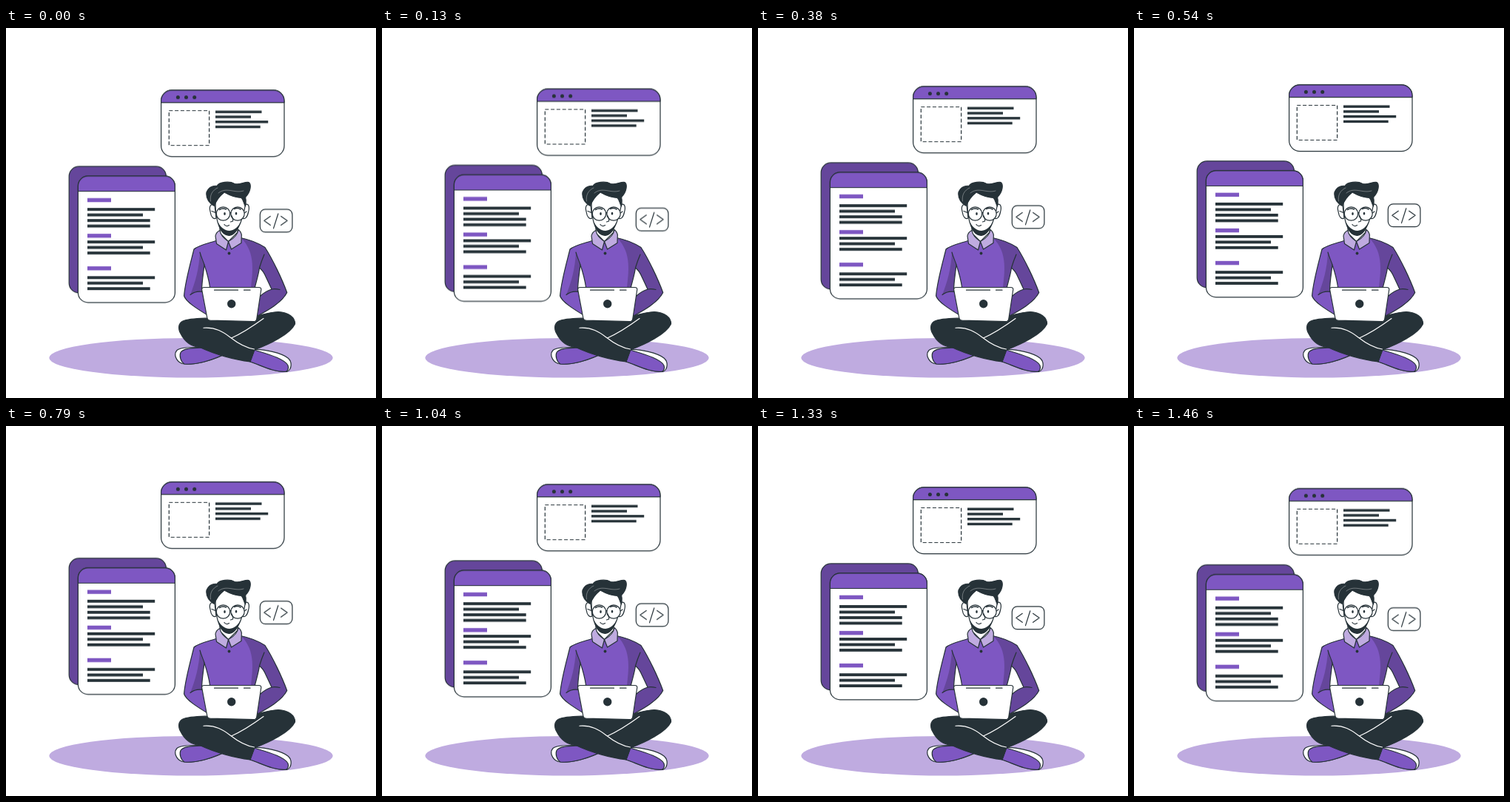
Write an HTML page that moves like this. It is 500 px wide and 500 px high and loops after 1.5 s.

```html
<!DOCTYPE html>
<html lang="en">
<head>
<meta charset="utf-8">
<title>Developer at work</title>
<style>
html, body { margin: 0; width: 100%; height: 100%; overflow: hidden; background: #fff; }
svg { display: block; width: 100vw; height: 100vh; }
.ink { fill: #263238; }
.main { fill: #7e57c2; }
.dark { fill: #65469b; }
.pale { fill: #bfabe0; }
.paper { fill: #fff; }
.none { fill: none; }
.line { stroke: #263238; stroke-width: 1.2; stroke-linecap: round; stroke-linejoin: round; }
.white { fill: none; stroke: #fff; stroke-width: 1.15; stroke-linecap: round; }
</style>
</head>
<body>
<svg viewBox="0 0 500 500">
  <ellipse class="pale" cx="250" cy="445.7" rx="191.7" ry="26.7"/>

  <g id="float">
    <g>
      <rect class="paper line" x="209.6" y="84.9" width="166.4" height="89.7" rx="14.5"/>
      <path class="main line" d="M209.6 101.6V99.4A14.5 14.5 0 0 1 224.1 84.9H361.5A14.5 14.5 0 0 1 376 99.4V101.6Z"/>
      <g class="ink">
        <circle cx="232.4" cy="94.4" r="2.5"/>
        <circle cx="243.5" cy="94.4" r="2.5"/>
        <circle cx="254.7" cy="94.4" r="2.5"/>
      </g>
      <rect class="none line" x="220.3" y="112.5" width="54.3" height="47" stroke-dasharray="5 2.8" style="stroke-linecap:butt"/>
    </g>
    <g>
      <rect class="dark line" x="85.2" y="187.9" width="131.2" height="171" rx="13.5"/>
      <rect class="paper line" x="97.4" y="200.9" width="131" height="171" rx="13.5"/>
      <path class="main line" d="M97.4 221.5V214.4A13.5 13.5 0 0 1 110.9 200.9H214.9A13.5 13.5 0 0 1 228.4 214.4V221.5Z"/>
    </g>
    <g id="bars"></g>
    <g class="none line">
      <rect class="paper" x="343.3" y="245.9" width="43.6" height="30.7" rx="7"/>
      <path d="M357.3 255.3L348.8 261.3L357.3 267.3M367.8 251.8L361.5 271.6M371.6 255.3L380.1 261.3L371.6 267.3"/>
    </g>
  </g>

  <g id="shoes">
    <path class="paper line" d="M262 431.5C248 431.5 236 431.500 231 435.500C226.500 440.500 229 450 238 453.500C252 456 276 450 291 443Z"/>
    <path class="main line" d="M266 432C252 432.500 240 432.500 236 438.500C234 443 236 451 241 454C257 455.500 277 449 293 442Z"/>
    <path class="paper line" d="M335 434.500C349 434 372 439 381 446C387 451 386.500 461 380 464.300C364 466 346 456 330 451Z"/>
    <path class="main line" d="M335.500 435C349 439.500 376 446 381 456C382.500 460 380.500 464 378 464.300C362 465.500 345 456 330 451Z"/>
  </g>

  <g id="legs">
    <path class="ink line" d="M274 392C262 392.500 247 392.500 239 396C233 399 232 406 236 413C241 423 250 430.500 262 431.500C282 441 309 448.500 330 450.800L336 434.800C355 428 384 414 390.500 400C391 391 381 384 368 383.500C356 384 348 387 340 389Z"/>
    <path class="white" d="M267 405.300C283 404 294 411 303 418C312 425 322 432 335.500 434M348 392.500C335 402 320 412 304.500 419"/>
  </g>

  <g id="body">
    <path class="main" d="M285 287C277 290 260 293.500 254 299C249 319 242 343 240.600 362C243 370 259 380 274 389H340C353 382 373 371 379.700 357.500C373 339 360 312 350 296.500C340 290 329 286 317 283.500Z"/>
    <path class="dark" d="M262 303C263 310 265 315 268 320L265 356C259 355.500 254 356.500 249 360.500C256 343 261 325 262 303Z"/>
    <path class="dark" d="M318 284C329 286 340 290 350 296.500C360 312 373 339 379.700 357.500C373 371 353 382 340 389L345 351H331C333 331 338 304 318 284Z"/>
    <path class="paper line" d="M268 320C271 329 274 339 275.500 350V356H264.500C264.500 343 267 330 268 320Z"/>
    <path class="paper line" d="M342.500 324C346 327 349 331 351 336L359 353C353 355 348 358 344 362L336 352C338 343 341 335 342.500 324Z"/>
    <path class="none line" d="M262 303C264 311 267 316 268 320M249 360.500C254 356.500 260 355.500 266 356.500M349 306C346 313 344 319 342.500 324M370 353.500C366 352.500 362 352.300 359 353"/>
    <path class="none line" d="M285 287C277 290 260 293.500 254 299C249 319 242 343 240.600 362C243 370 259 380 274 389M317 283.500C329 286 340 290 350 296.500C360 312 373 339 379.700 357.500C373 371 353 382 340 389"/>
    <path class="paper line" d="M289 269V277L300.500 288.500L313 276V266Z"/>
    <path class="pale line" d="M289 273.500C286 275 283.500 278 283 281L284.500 291.500L297.500 300L300.500 288.500C295 285 290 280 289 273.500ZM314 272.500C317 275 318.500 278 318.300 281L318 290.500L304.500 299L300.500 288.500C307 285 313 280 314 272.500Z"/>
    <circle class="ink" cx="301.500" cy="304.500" r="1.900"/>
  </g>

  <g id="head">
    <path class="paper line" d="M282 240C277 236 274 241 276 248C277 255 280 259 284 257ZM323 239C328 236 329.500 242 327.500 249C326 256 323 259 319 257Z"/>
    <path class="paper line" d="M283 236C283 252 284.500 260 288 268C291 276 296 280 301.500 280.300C308 280 313 273 317 263C320 255 323.500 245 324 232L311 221L289 222Z"/>
    <path class="ink" d="M286 261C288 272 293 280 301.500 280.500C309 280 314 272 317.500 261C314.500 268 309 273.500 302 274C295 273.500 289 269 286 261Z"/>
    <path class="ink line" d="M281.500 240.500C274 236 270 230 271 222C274 215 280 212.500 285 213.500C288 208 302 206.500 309 210.500C316 212.500 322 207.500 328 208.500C332 211 330.500 222 324 228C323 231 325 237 323.500 241C321 237 321 232 318 229.500C309 229 302 226 295 222C290 226 284 233 281.500 240.500Z"/>
    <path class="white" style="stroke-width:.5;opacity:.7" d="M276.500 234C275 226 279 219 286 216M287 223C298 214 309 224 321 220"/>
    <g class="none line">
      <circle class="paper" cx="293.500" cy="251" r="9.200"/>
      <circle class="paper" cx="313" cy="251" r="9.200"/>
      <path d="M302.500 250Q303.300 248.500 304 250M284.300 250L278 247.500M322.200 250L325 248"/>
      <path stroke-width="1.500" d="M288.500 245.500Q292.500 243 297.500 245M308.500 244.500Q313 242.500 317 245"/>
      <path d="M304.500 253C306 256 307.500 259 306.500 261L303.500 262M295 265.500C296.500 268 299.500 268 301.500 266.500"/>
    </g>
    <ellipse class="ink" cx="295.500" cy="251" rx="1.300" ry="1.900"/>
    <ellipse class="ink" cx="311" cy="250.700" rx="1.300" ry="1.900"/>
  </g>

  <g id="laptop">
    <path class="paper line" d="M268 350.500H341.500Q345.300 350.500 344.700 354L338.800 393Q338.200 396.800 334.500 396.600L276 395.200Q272.500 395 271.800 391.500L264.700 354Q264.200 350.500 268 350.500Z"/>
    <path class="none line" d="M281.500 354.200H313.500M321.500 354.200H330"/>
    <circle class="ink" cx="304.700" cy="372.700" r="5.700"/>
  </g>
</svg>
<script>
const NS = 'http://www.w3.org/2000/svg';
const bars = document.getElementById('bars');

function addBars(x, y, gap, h, color, widths) {
  widths.forEach((w, i) => {
    const bar = document.createElementNS(NS, 'rect');
    const box = { x, y: y + i * gap, width: w, height: h, class: color };
    for (const key in box) bar.setAttribute(key, box[key]);
    bars.append(bar);
  });
}

addBars(283, 112.5, 6.75, 3.4, 'ink', [62.5, 48, 71.2, 60.7]);
for (const y of [230.7, 278.9, 322.9]) addBars(110, y, 0, 5.4, 'main', [32]);
addBars(110, 244, 7.5, 3.9, 'ink', [91.2, 75, 84.7, 84.7]);
for (const y of [288, 336.2]) addBars(110, y, 7.45, 3.9, 'ink', [91.2, 75, 84.7]);

// Linear bob of 10 units, stepped at 24 poses a second.
const LOOP = 1500, STEPS = 36, REST = -0.3, LIFT = 10;
const poses = Array.from({ length: STEPS }, (_, i) => {
  const phase = (i + 1) / STEPS;
  const y = REST - LIFT * (1 - Math.abs(1 - 2 * phase));
  return {
    offset: Math.round(i * 100 / 24) * 10 / LOOP,
    transform: `translateY(${y}px)`,
    easing: 'steps(1, end)'
  };
});
poses.push({ offset: 1, transform: poses[STEPS - 1].transform });
document.getElementById('float').animate(poses, { duration: LOOP, iterations: Infinity });
</script>
</body>
</html>
```
